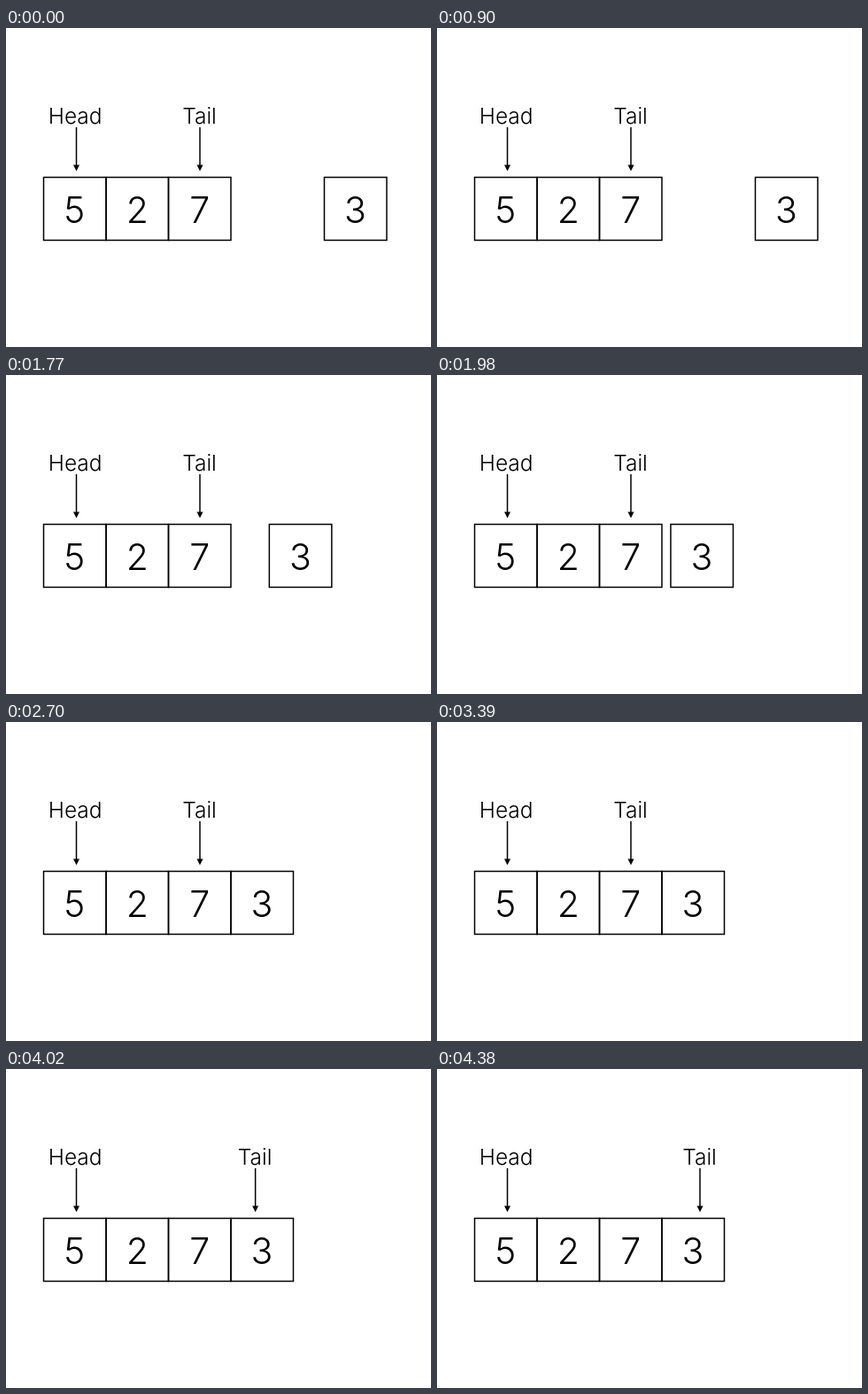
An HTML page for the animation above (4500 ms loop, 480 by 360 pixels).

```html
<!DOCTYPE html>
<html lang="en">
<head>
<meta charset="utf-8">
<title>Queue: enqueue</title>
<style>
  html, body { margin: 0; width: 100%; height: 100%; overflow: hidden; background: #fff; }
  svg { display: block; width: 480px; height: 360px; }
  text { font: 300 24.5px Inter, "Liberation Sans", sans-serif; text-anchor: middle; fill: #000; }
  .digit { font-size: 41px; }
  .box, .shaft { fill: none; stroke: #000; stroke-width: 1.5; }
</style>
</head>
<body>
<svg viewBox="0 0 480 360">
  <defs>
    <rect id="box" class="box" y="168.5" width="70.5" height="71"/>
    <g id="arrow">
      <path class="shaft" d="M0 112V156"/>
      <path d="M-3.5 154.5H3.5L0 161.5Z"/>
    </g>
  </defs>
  <use href="#box" x="42.5"/><text class="digit" x="77.5" y="220">5</text>
  <use href="#box" x="113"/><text class="digit" x="148.3" y="220">2</text>
  <use href="#box" x="183.5"/><text class="digit" x="218.7" y="220">7</text>
  <text x="78.2" y="107.5">Head</text>
  <use href="#arrow" x="79.5"/>
  <g id="tail">
    <text x="218.5" y="107.5">Tail</text>
    <use href="#arrow" x="219"/>
  </g>
  <g id="item">
    <use href="#box" x="359.5"/><text class="digit" x="394.5" y="220">3</text>
  </g>
</svg>
<script>
  const LOOP = 4500;
  const item = document.getElementById("item");
  const tail = document.getElementById("tail");

  function slide(node, time, start, duration, distance) {
    const p = Math.min(1, Math.max(0, (time - start) / duration));
    const eased = (1 - Math.cos(Math.PI * p)) / 2;
    node.setAttribute("transform", `translate(${distance * eased} 0)`);
  }

  function draw() {
    const time = performance.now() % LOOP;
    slide(item, time, 1292, 860, -105.5);
    slide(tail, time, 3395, 885, 78);
    requestAnimationFrame(draw);
  }
  draw();
</script>
</body>
</html>
```
